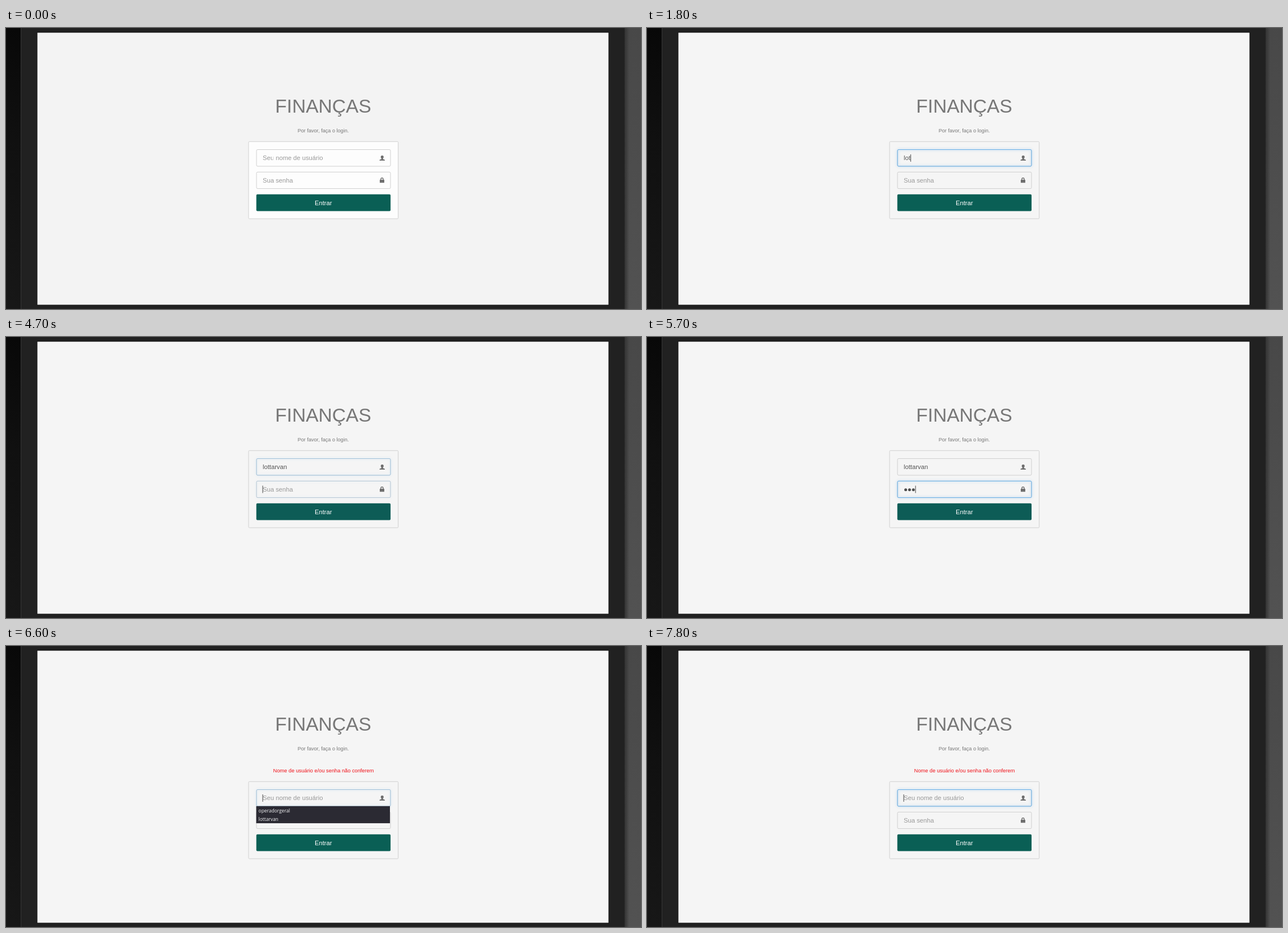
Animation of 1123 by 498 pixels, one loop 8 s. Source, as an HTML page:

```html
<!DOCTYPE html>
<html lang="pt-BR">
<head>
<meta charset="utf-8">
<title>Login</title>
<style>
  html, body { margin: 0; width: 100%; height: 100%; overflow: hidden; background: #212121; }
  svg { display: block; width: 1123px; height: 498px; }
  text { font-family: "Liberation Sans", Arial, sans-serif; font-size: 11.2px; fill: #555; white-space: pre; }
  .title { font-size: 33.6px; fill: #777; }
  .hint { font-size: 9.1px; fill: #777; }
  .error { font-size: 9.25px; fill: #f01018; }
  .placeholder { fill: #999; }
  .mid { text-anchor: middle; }
  .popup text, .status text { font-family: "Open Sans", "Noto Sans", sans-serif; font-size: 8.4px; fill: #f2f2f4; }
  .frame { fill: none; stroke: #cfcfcf; }
  .glow { stroke: #66afe9; filter: drop-shadow(0 0 2.5px rgba(102, 175, 233, .75)); }
  .icon { fill: #6e6e6e; }
  .caret { fill: #444; }
</style>
</head>
<body>
<svg viewBox="0 0 1123 498">
  <defs>
    <linearGradient id="left" x2="0" y2="1">
      <stop stop-color="#080808"/><stop offset=".4" stop-color="#101010"/><stop offset="1" stop-color="#171717"/>
    </linearGradient>
    <linearGradient id="right" x2="0" y2="1">
      <stop stop-color="#484848"/><stop offset="1" stop-color="#525252"/>
    </linearGradient>
    <linearGradient id="edge">
      <stop stop-color="#333"/><stop offset="1" stop-color="#333" stop-opacity="0"/>
    </linearGradient>
  </defs>
  <rect width="1123" height="498" fill="#212121"/>
  <rect width="26" height="498" fill="url(#left)"/>
  <rect x="26" width="1" height="498" fill="#363636"/>
  <rect x="1094" width="29" height="498" fill="url(#right)"/>
  <rect x="1094" width="8" height="498" fill="url(#edge)"/>
  <rect x="54.5" y="7" width="1012" height="484.5" fill="#151515"/>
  <rect id="page" x="55.5" y="8.3" width="1010" height="482.2"/>

  <text class="title mid" x="561" y="150">FINANÇAS</text>
  <text class="hint mid" x="561" y="185">Por favor, faça o login.</text>
  <text id="error" class="error mid" x="561.5" y="223.5">Nome de usuário e/ou senha não conferem</text>

  <g id="form">
    <rect id="panel" x="429" y="201.3" width="264.6" height="136.7" rx="1.5" stroke="#d0d0d0"/>
    <g id="user">
      <rect class="frame" x="443" y="215.5" width="237" height="29.5" rx="2"/>
      <rect class="frame glow" x="443" y="215.5" width="237" height="29.5" rx="2"/>
      <text class="placeholder" x="454" y="234">Seu nome de usuário</text>
      <text class="value" x="454" y="234"></text>
      <rect class="caret" y="224" width="1" height="13"/>
    </g>
    <path class="icon" d="M665.3 226c1.9 0 2.7 1.3 2.5 2.9-.2 1.3-.7 2-1.2 2.5v.8l2.5 1c.8.3 1 .8 1 1.8h-9.6c0-1 .2-1.5 1-1.8l2.5-1v-.8c-.5-.5-1-1.2-1.2-2.5-.2-1.6.6-2.9 2.5-2.9z"/>
    <g id="pass">
      <rect class="frame" x="443" y="255.3" width="237" height="29.3" rx="2"/>
      <rect class="frame glow" x="443" y="255.3" width="237" height="29.3" rx="2"/>
      <text class="placeholder" x="454" y="274">Sua senha</text>
      <g class="dots" fill="#4c4c4c"></g>
      <rect class="caret" y="263.5" width="1" height="13"/>
    </g>
    <path class="icon" fill-rule="evenodd" d="M661 269h1.3v-1.2a2.7 2.7 0 0 1 5.4 0V269h1.3v5.3h-8zM663.7 269h2.6v-1.1a1.3 1.3 0 0 0-2.6 0z"/>
    <rect id="button" x="442.7" y="294.7" width="237.4" height="29.8" rx="2"/>
    <text class="mid" x="561.3" y="313.6" style="fill:#fff">Entrar</text>
    <rect id="pointer" x="472.4" y="225" width="1.3" height="11" fill="#fdfdfd"/>
    <g id="popup" class="popup">
      <rect x="442.5" y="244.8" width="236.5" fill="#2b2a33"/>
      <text x="446.6" y="256.2">operadorgeral</text>
      <text x="446.6" y="271">lottarvan</text>
    </g>
  </g>

  <g id="status" class="status">
    <rect x="55.5" y="475" width="195" height="15.5" fill="#333"/>
    <text x="57.3" y="487">Esperando por localhost...</text>
  </g>
</svg>
<script>
const LOOP = 8000, TICK = 100, NAME = "lottarvan", LEFT = 454, DOT = 6.8;
const $ = s => document.querySelector(s);
const within = (t, ...spans) => spans.some(([a, b]) => t >= a && t < b);
const show = (el, on) => { el.style.display = on ? "" : "none"; };

// [time, value] steps: the last one reached holds.
const at = (steps, t) => steps.reduce((v, [from, next]) => t >= from ? next : v, 0);

const nameLength = [[1600, 1], [1700, 2], [1800, 3], [2000, 4], [2400, 3], [3300, 4],
  [3700, 5], [3800, 6], [4000, 9], [6600, 0]];
const dotCount = [[5400, 1], [5600, 2], [5700, 3], [5900, 4], [6000, 5], [6600, 0]];
const userGlow = [[100, .45], [200, 1], [4700, .45], [4800, 0], [6600, .45], [6700, 1]];
const passGlow = [[4700, .25], [4800, 1], [6600, 0]];
const userCaret = [[100, 600], [1100, 2700], [3000, 3500], [3700, 4400], [6600, 7000], [7500, 8000]];
const passCaret = [[4700, 5200], [5400, 6400]];

const value = $("#user .value"), dots = $("#pass .dots");
for (let i = 0; i < 5; i++) {
  const dot = document.createElementNS("http://www.w3.org/2000/svg", "circle");
  dot.setAttribute("cx", 457.5 + i * DOT);
  dot.setAttribute("cy", 270.8);
  dot.setAttribute("r", 2.5);
  dots.append(dot);
}

function drawField(id, glow, filled, caret, caretX) {
  $(id + " .glow").style.opacity = glow;
  show($(id + " .placeholder"), !filled);
  const bar = $(id + " .caret");
  show(bar, caret);
  bar.setAttribute("x", caretX);
}

function draw(t) {
  const failed = t >= 6600, fresh = t < 100;
  $("#page").setAttribute("fill", fresh ? "#f3f3f3" : "#f5f5f5");
  $("#panel").setAttribute("fill", fresh ? "#fdfdfd" : "#f5f5f5");
  $("#button").setAttribute("fill", within(t, [4700, 6600]) ? "#0d5c56" : "#0a5f55");
  $("#form").setAttribute("transform", `translate(0 ${failed ? 39 : 0})`);
  show($("#error"), failed);

  const typed = at(nameLength, t), secret = at(dotCount, t);
  value.textContent = NAME.slice(0, typed);
  const end = typed ? LEFT + value.getComputedTextLength() : LEFT - .5;
  drawField("#user", at(userGlow, t), typed, within(t, ...userCaret), end);
  drawField("#pass", at(passGlow, t), secret, within(t, ...passCaret),
    secret ? LEFT + secret * DOT : LEFT - .5);
  [...dots.children].forEach((dot, i) => show(dot, i < secret));

  show($("#pointer"), t < 600);
  show($("#popup"), within(t, [200, 1700], [6600, 7400]));
  $("#popup rect").setAttribute("height", failed ? 30.3 : 15.6);
  show($("#popup text:last-child"), failed);
  show($("#status"), within(t, [6200, 6600]));
}

let last = -1;
function loop() {
  const t = Math.floor(performance.now() % LOOP / TICK) * TICK;
  if (t !== last) draw(last = t);
  requestAnimationFrame(loop);
}
draw(0);
loop();
</script>
</body>
</html>
```
